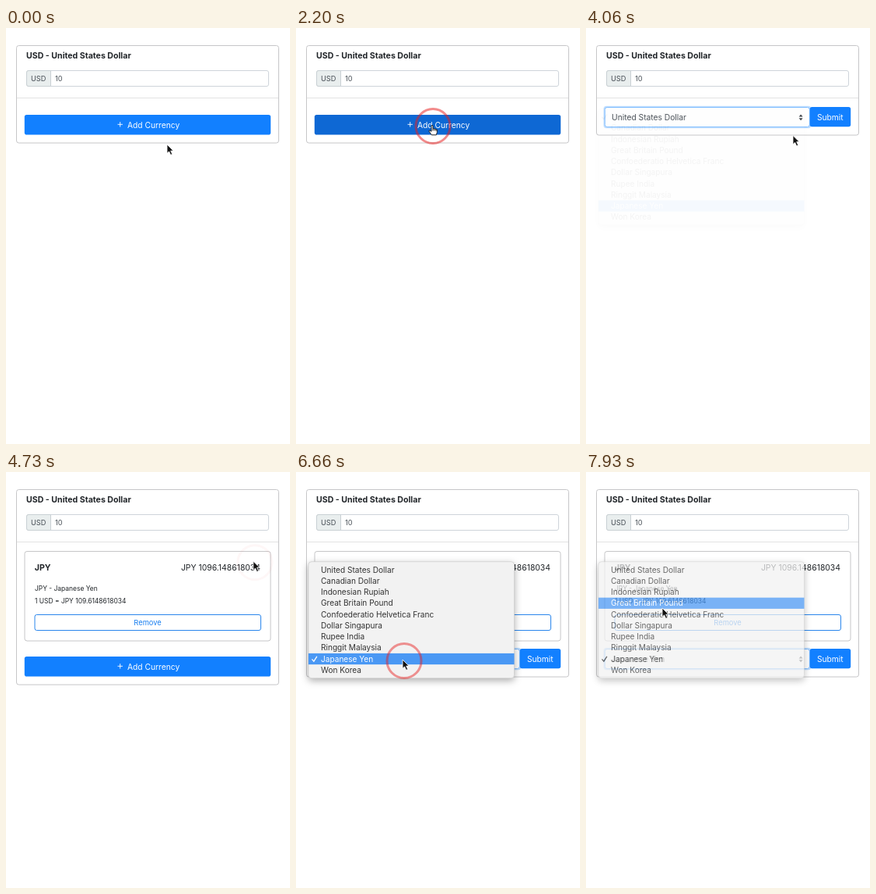
Animation, 365 px wide and 532 px high, one loop 8000 ms. Source, as an HTML page:

```html
<!DOCTYPE html>
<html lang="en">
<head>
<meta charset="utf-8">
<title>Currency list</title>
<style>
  html, body { margin: 0; width: 100%; height: 100%; overflow: hidden; background: #fff; }
  svg { display: block; width: 365px; height: 532px; font: 10.25px Inter, "Open Sans", sans-serif; fill: #212529; }
  .bold { font-size: 10.6px; font-weight: 700; }
  .field { font-size: 9.2px; fill: #495057; }
  .small { font-size: 8.45px; }
  .white { fill: #fff; }
  .frame { fill: #fff; stroke: #c6c6c8; }
  .input { fill: #fff; stroke: #ced4da; }
  #menu text { font-size: 10.1px; fill: #333; }
  #menu .on { fill: #fff; }
  #panel { filter: drop-shadow(0 3px 5px rgba(0, 0, 0, .32)); }
</style>
</head>
<body>
<svg viewBox="0 0 365 532">
  <rect id="card" class="frame" x="13.5" y="22.5" width="337" rx="3"/>
  <text class="bold" x="26" y="38.9">USD - United States Dollar</text>
  <rect class="input" x="26.5" y="54.5" width="311" height="20" rx="2.5"/>
  <path d="M57.5 54.5H29a2.5 2.5 0 0 0-2.5 2.5v15a2.5 2.5 0 0 0 2.5 2.5h28.500z" fill="#e9eeee" stroke="#c9d0d4"/>
  <text class="field" x="32" y="67.800">USD</text>
  <text class="field" x="63" y="67.800">10</text>
  <path d="M14 89.500H350" stroke="#e3e3e3"/>

  <g id="result">
    <rect class="frame" x="24" y="101.500" width="316" height="114.500" rx="3"/>
    <text class="bold" x="36.800" y="125.900">JPY</text>
    <text x="327" y="125.900" text-anchor="end" font-size="10.4">JPY 1096.148618034</text>
    <text class="small" x="37" y="152.400">JPY - Japanese Yen</text>
    <text class="small" x="37" y="168.200">1 USD = JPY 109.6148618034</text>
    <rect x="37" y="182.500" width="290.500" height="20" rx="2.500" fill="#fff" stroke="#2a86ec"/>
    <text x="182" y="195.900" text-anchor="middle" font-size="9.3" fill="#1a7ff0">Remove</text>
  </g>

  <g id="add">
    <rect id="addButton" x="23.800" y="111" width="316.400" height="25.600" rx="2.800"/>
    <path d="M143.500 123.300h6.400m-3.200-3.200v6.400" stroke="#fff" stroke-width=".9"/>
    <text class="white" x="156" y="127.600">Add Currency</text>
  </g>

  <g id="form">
    <rect id="glow" x="22.500" y="99.700" width="267" height="28.600" rx="4" fill="#bfdeff"/>
    <rect id="select" class="input" x="24.300" y="101.500" width="263" height="25" rx="2.800"/>
    <text id="value" x="33" y="117.700" fill="#495057"></text>
    <path d="M273.600 113.400l2.500-3 2.500 3zm0 1.800l2.500 3 2.500-3z" fill="#343a40"/>
    <rect id="submitButton" x="287.700" y="101" width="52.500" height="25.300" rx="2.800"/>
    <text class="white" x="313.800" y="117.700" text-anchor="middle">Submit</text>
  </g>

  <g id="menu">
    <rect id="panel" x="16" y="103.200" width="264.500" height="149" rx="4" fill="#f2f2f2" stroke="#c4c4c4" stroke-width=".6"/>
    <rect id="bar" x="16" width="264.500" height="14.250" fill="#4a98f4"/>
    <path id="check" d="M20.500 113.800l2.400 2.800 4-6.200" fill="none" stroke-width="1.300"/>
  </g>

  <circle id="ring" r="22" fill="none" stroke="#e62020" stroke-width="3"/>
  <path id="arrow" d="M0 0v11.200l2.600-2.300 2 4.400 2.100-.9-2-4.300h3.400z" fill="#111" stroke="#fff" stroke-width=".8"/>
  <path id="hand" d="M0 .9Q1 -.4 2 .9V5l1-.4 1 .6 1-.2 1 .7 1.300.3V9.500L6.300 12.800H.3L-2.900 8.200Q-3.400 6.700-2 6.900L0 8.300zM2 5v2.500M4 5.500v2M6 6v1.800" fill="#fff" stroke="#111" stroke-width=".9" stroke-linejoin="round"/>
</svg>
<script>
const LOOP = 8000, ROW = 14.25, SHIFT = 125;
const names = ["United States Dollar", "Canadian Dollar", "Indonesian Rupiah", "Great Britain Pound",
  "Confoederatio Helvetica Franc", "Dollar Singapura", "Rupee India", "Ringgit Malaysia", "Japanese Yen", "Won Korea"];
// time, x, y of the pointer's tip
const path = [
  [0, 207, 149], [120, 207, 149], [460, 190, 124], [900, 178, 123], [1330, 174, 124], [2300, 174, 124],
  [2650, 146, 117], [3040, 142, 117], [3310, 136, 220.6], [3740, 136, 220.6], [4060, 266, 137.5],
  [4330, 318, 114], [4720, 318, 114], [5260, 186, 273], [5460, 172.5, 258.5], [5600, 172, 250],
  [5780, 172, 250], [6200, 160, 302], [6330, 152, 293], [6530, 138, 241], [6660, 137, 240],
  [7180, 137, 240], [7580, 98, 174], [8000, 98, 174]];
const clicks = [2130, 2720, 4480, 5660, 6520];

const el = Object.fromEntries([...document.querySelectorAll("[id]")].map(e => [e.id, e]));
const set = (e, attrs) => { for (const k in attrs) e.setAttribute(k, attrs[k]); };
const show = (e, on) => { e.style.display = on ? "" : "none"; };
const clamp = v => Math.min(1, Math.max(0, v));
const within = (t, a, b) => t >= a && t < b;
const move = (x, y) => ({ transform: `translate(${x} ${y})` });

const items = names.map((name, i) => {
  const text = document.createElementNS("http://www.w3.org/2000/svg", "text");
  text.textContent = name;
  set(text, { x: 32, y: 117.2 + i * ROW });
  return el.menu.appendChild(text);
});

function pointerAt(t) {
  const i = Math.max(1, path.findIndex(p => p[0] > t));
  const [t0, x0, y0] = path[i - 1], [t1, x1, y1] = path[i];
  const u = (t - t0) / (t1 - t0), k = u * u * (3 - 2 * u);
  return [x0 + (x1 - x0) * k, y0 + (y1 - y0) * k];
}

function buttonColor(t, start) {
  const k = clamp((t - start) / 150);
  return `rgb(${[[18, 14], [128, 104], [255, 212]].map(([a, b]) => Math.round(a + (b - a) * k))})`;
}

// The closing menu leaves a brief faint trace.
function menuOpacity(t) {
  if (within(t, 2800, 4130)) return Math.max(.05, clamp(1 - (t - 3740) / 260));
  return t >= 6600 ? clamp(1 - (t - 7860) / 270) : 0;
}

function draw(t) {
  const [x, y] = pointerAt(t);
  const added = t >= 4660, formOpen = within(t, 2270, 4660) || t >= 5740;
  const offset = added ? SHIFT : 0;
  const chosen = t >= 4130 ? 8 : 0;

  set(el.card, { height: (formOpen ? 114.500 : 124.500) + offset });
  show(el.result, added);
  show(el.add, !formOpen);
  show(el.form, formOpen);
  set(el.add, move(0, offset));
  set(el.form, move(0, offset));

  const addHover = within(t, 330, 2270) ? 330 : within(t, 5430, 5740) ? 5430 : LOOP;
  const submitHover = within(t, 4170, 4660) ? 4170 : LOOP;
  set(el.addButton, { fill: buttonColor(t, addHover) });
  set(el.submitButton, { fill: buttonColor(t, submitHover) });

  const focused = within(t, 2720, 4480) || t >= 6520;
  show(el.glow, focused);
  el.select.style.stroke = focused ? "#80bdff" : "";
  el.value.textContent = names[chosen];

  const opacity = menuOpacity(t), menuY = added ? 11.5 : 0;
  show(el.menu, opacity > 0);
  set(el.menu, { opacity, ...move(0, menuY) });
  const rowY = within(t, 3740, 4130) ? 220.6 : y;
  const row = Math.min(9, Math.max(0, Math.floor((rowY - menuY - 106.4) / ROW)));
  set(el.bar, { y: 106.4 + row * ROW });
  items.forEach((item, i) => item.classList.toggle("on", i === row));
  set(el.check, { stroke: row === chosen ? "#fff" : "#333", ...move(0, chosen * ROW) });

  const click = clicks.find(c => within(t, c, c + 260));
  show(el.ring, click !== undefined);
  set(el.ring, { opacity: .52 * clamp((click + 260 - t) / 130), ...move(x + 2, y + 1.5) });

  const hand = addHover < LOOP || submitHover < LOOP;
  show(el.hand, hand);
  show(el.arrow, !hand);
  set(hand ? el.hand : el.arrow, move(x, y));
}

function tick() {
  draw(performance.now() % LOOP);
  requestAnimationFrame(tick);
}
tick();
</script>
</body>
</html>
```
